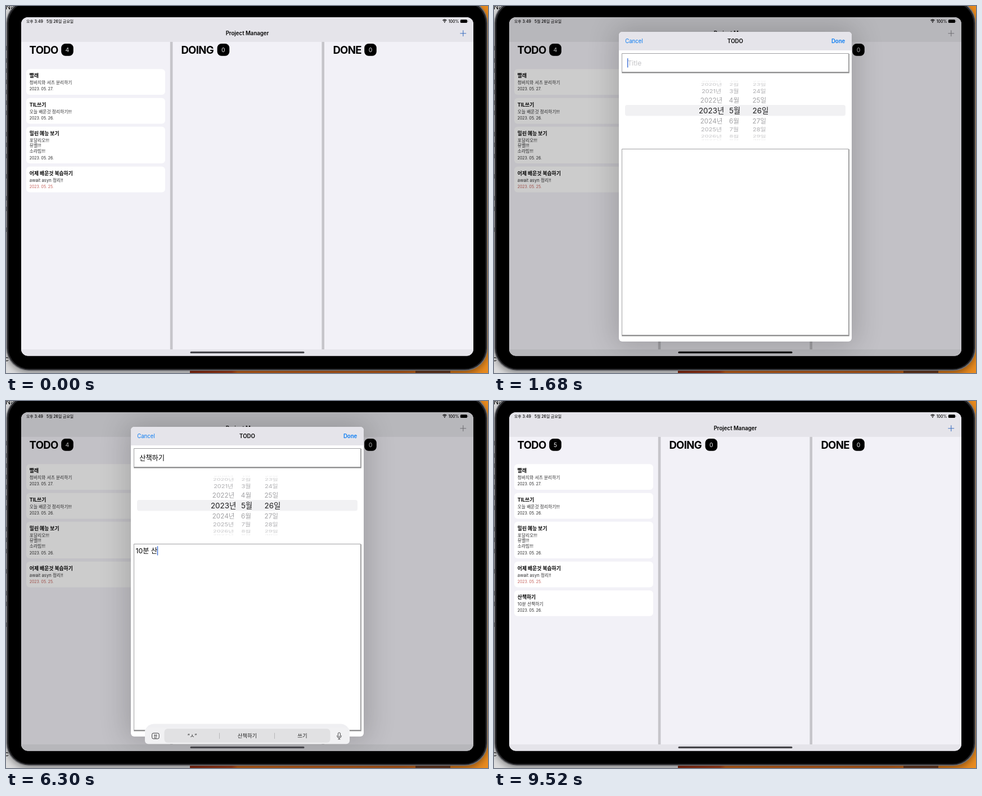
Recreate the animation shown at these times as an HTML page. Size 857 by 653 pixels, loop 9590 ms.

```html
<!DOCTYPE html>
<html lang="ko">
<head>
<meta charset="utf-8">
<title>Project Manager</title>
<style>
  html, body { margin: 0; width: 100%; height: 100%; overflow: hidden; background: #000; }
  svg { display: block; width: 857px; height: 653px; }
  text { font-family: Inter, "Noto Sans CJK KR", "Noto Sans CJK", sans-serif; white-space: pre; }
  .nav { font-size: 9.65px; font-weight: 600; }
  .head { font-size: 18.6px; font-weight: 700; letter-spacing: -.7px; }
  .title { font-size: 8.8px; font-weight: 700; }
  .note { font-size: 7.75px; fill: #303032; }
  .date { font-size: 6.9px; fill: #222; }
  .late { fill: #c25a54; }
  .status { font-size: 6.9px; font-weight: 500; }
  .badge { font-size: 10.5px; fill: #e4e4e6; }
  .input { font-size: 12.2px; }
  .word { font-size: 9.4px; fill: #222; }
  .blue { fill: #087bf3; }
  .mid { text-anchor: middle; }
  .end { text-anchor: end; }
</style>
</head>
<body>
<svg id="stage" viewBox="0 0 857 653"></svg>
<script>
const LOOP = 9590, STEP = 70;

const text = (x, y, cls, s, extra = '') => `<text x="${x}" y="${y}" class="${cls}" ${extra}>${s}</text>`;
const rect = (x, y, w, h, fill, r = 0, extra = '') =>
  `<rect x="${x}" y="${y}" width="${w}" height="${h}" rx="${r}" fill="${fill}" ${extra}/>`;
const line = (d, stroke, w = 1, extra = '') =>
  `<path d="${d}" fill="none" stroke="${stroke}" stroke-width="${w}" ${extra}/>`;

function card(y, title, notes, date, late = '') {
  const extra = (notes.length - 1) * 9.8;
  return rect(36, y, 247, 45.8 + extra * .99, '#fff', 6) +
    text(41.8, y + 15.2, 'title', title) +
    notes.map((n, i) => text(41.8, y + 26.8 + i * 9.8, 'note', n)).join('') +
    text(41.8, y + 38.2 + extra, 'date ' + late, date);
}

function column(x, name, badgeX, id) {
  return text(x, 84.6, 'head', name) + rect(badgeX, 67, 21.6, 21.8, '#000', 7.5) +
    text(badgeX + 10.8, 81.7, 'badge mid', '0', `id="${id}"`);
}

function backdrop() {
  const scraps = [75, 97, 115, 135, 153, 172, 190, 228, 247, 267, 303, 342, 361, 398]
    .map(y => rect(0, y - 4, 1.4, 8, '#333')).join('');
  return rect(0, 0, 857, 653, '#dcdcdd') + rect(327, 0, 530, 653, 'url(#dusk)') +
    rect(728, 648, 62, 5, '#6b3a20') + scraps +
    text(-1, 6, 'input', 'Na') + text(-2, 632, 'input', 'c') +
    rect(0, -6, 857, 660, '#000', 42, 'opacity=".35" style="filter:blur(6px)"') +
    rect(.5, -10, 856, 659, '#707175', 40) + rect(2, -8.5, 853, 656, '#242427', 39) +
    rect(4.5, -6, 848, 651.5, '#000', 37);
}

function board() {
  return rect(27, 20, 804, 603, '#f2f1f7') + rect(27, 20, 804, 43.8, '#e5e4ea') +
    rect(27, 611, 804, 12, '#e5e4ea') +
    rect(291.8, 63.8, 4.6, 547.2, '#c6c5ca') + rect(561.4, 63.8, 4.6, 547.2, '#c6c5ca') +
    text(36, 29.5, 'status', '오후 3:49') + text(72, 29.5, 'status', '5월 26일 금요일') +
    text(805.3, 29.5, 'status end', '100%') +
    line('M776.4 25.6a5 5 0 0 1 7 0M777.8 27.2a3 3 0 0 1 4.2 0', '#000', 1.1) +
    '<path d="M779.9 30l-1.2-1.3a1.7 1.7 0 0 1 2.4 0z"/>' +
    rect(807.8, 24.2, 12.2, 5.8, '#000', 1.6) + rect(820.6, 26, 1, 2.2, '#777', .5) +
    text(429, 52.3, 'nav mid', 'Project Manager') +
    line('M807.4 48.7h10.8M812.8 43.3v10.8', '#3d6fc0', 1.1, 'id="plus"') +
    column(41.6, 'TODO', 98.2, 'count') + column(311.4, 'DOING', 375.6) + column(581.4, 'DONE', 637.2) +
    card(112.2, '빨래', ['청바지와 셔츠 분리하기'], '2023. 05. 27.') +
    card(163.7, 'TIL쓰기', ['오늘 배운것 정리하기!!!'], '2023. 05. 26.') +
    card(214.8, '밀린 예능 보기', ['포달리오!!!', '뮤벨!!!', '소라빔!!!'], '2023. 05. 26.') +
    card(285.8, '어제 배운것 복습하기', ['await asyn 정리!!'], '2023. 05. 25.', 'late') +
    `<g id="added">${card(337, '산책하기', ['10분 산책하기'], '2023. 05. 26.')}</g>`;
}

function wheel() {
  // per distance from the centre: offset, font size, vertical squash, colour
  const rings = [[0, 13.4, 1, '#1c1c1e'], [18.5, 11.7, .95, '#a0a0a3'], [34.2, 11, .83, '#adadb0'],
                 [46.3, 11, .52, '#c6c6c8'], [52, 11, .16, '#e6e6e7']];
  let out = rect(233, 130, 392, 19.6, '#f1f1f3', 4);
  for (let i = -4; i <= 4; i++) {
    const [dy, size, squash, fill] = rings[Math.abs(i)];
    const shift = i ? 1 : 0;
    const put = (x, s) => text(0, size * .36, 'mid', s,
      `font-size="${size}" fill="${fill}" transform="translate(${x} ${140 + Math.sign(i) * dy}) scale(1 ${squash})"`);
    out += put(386.6, 2023 + i + '년') + put(428 - shift, 5 + i + '월') + put(474 - shift * 2.2, 26 + i + '일');
  }
  return out;
}

function field(y, h) {
  const frame = `M227.5 ${y}h403v${h}h-403z`;
  return line(frame, '#000', 1.6, 'class="glow" transform="translate(.5 1.2)" style="filter:blur(.7px)"') +
    `<path d="${frame}" fill="#fff" stroke="#a0a0a2" stroke-width="1"/>`;
}

function sheet() {
  return rect(222, 0, 414, 551, '#fff', 6) +
    '<path d="M222 33V6a6 6 0 0 1 6-6H630a6 6 0 0 1 6 6V33z" fill="#e5e4ea"/>' +
    text(233.2, 20, 'nav blue', 'Cancel', 'style="font-weight:400"') + text(429, 20, 'nav mid', 'TODO') +
    text(624.3, 20, 'nav blue end', 'Done', 'id="done"') +
    field(38.5, 33) + field(208.5, 331) + wheel() +
    text(237.5, 59.8, 'input', 'Title', 'id="hint" fill="#c4c4c7"') +
    text(237.2, 59.7, 'input', '', 'id="name"') + text(230.5, 225, 'input', '', 'id="body"') +
    rect(0, 0, 1.4, 16.5, '#3d6fd6', .6, 'id="caret"');
}

function keyboardBar() {
  const words = [331, 429, 527].map(x => text(x, 599, 'word mid', '', 'data-word')).join('');
  return rect(247, 574.5, 364, 35, '#ededf0', 16, 'opacity=".85"') +
    rect(247, 581, 364, 29.2, '#f1f1f3', 6) + rect(281.5, 583, 295, 25, '#e1e1e3', 6) +
    line('M379.5 590.5v10.5M477.5 590.5v10.5', '#b2b2b5', .9) + words +
    rect(259.6, 591, 12.6, 10, 'none', 2.6, 'stroke="#3a3a3c" stroke-width="1"') +
    text(265.9, 598.6, 'mid', '한', 'font-size="6.6" font-weight="500"') +
    rect(590.4, 590, 4, 7.4, 'none', 2, 'stroke="#3a3a3c" stroke-width=".9"') +
    line('M588.6 595v.8a3.8 3.6 0 0 0 7.6 0v-.8M592.4 599.4v2.4M590.4 601.8h4', '#3a3a3c', .9);
}

document.getElementById('stage').innerHTML = `
  <defs>
    <clipPath id="screen"><rect x="27" y="20" width="804" height="602.5" rx="12"/></clipPath>
    <linearGradient id="dusk">
      <stop offset="0" stop-color="#8a2b13"/><stop offset=".14" stop-color="#a8401a"/>
      <stop offset=".16" stop-color="#c9661d"/><stop offset=".7" stop-color="#c0601c"/>
      <stop offset="1" stop-color="#ea8c1f"/>
    </linearGradient>
  </defs>
  ${backdrop()}
  <g clip-path="url(#screen)">
    ${board()}
    ${rect(27, 20, 804, 603, '#000', 0, 'id="dim"')}
    <g id="modal">
      ${rect(214, -8, 430, 567, '#000', 14, 'id="shade" style="filter:blur(25px)"')}
      ${sheet()}
    </g>
    <g id="keys">${keyboardBar()}</g>
    ${rect(327.5, 614.7, 203, 3.3, '#000', 1.6, 'id="home"')}
  </g>`;

const $ = id => document.getElementById(id);
const set = (id, attrs) => { for (const k in attrs) $(id).setAttribute(k, attrs[k]); };
const wordSlots = document.querySelectorAll('[data-word]');
const glows = document.querySelectorAll('.glow');

const nameKeys = [[0, ''], [2450, 'ㅅ'], [2590, '사'], [2730, '산'], [2800, '산ㅊ'], [2940, '산채'],
  [3080, '산책'], [3360, '산책ㅎ'], [3430, '산책하'], [3570, '산책학'], [3710, '산책하기']];
const bodyKeys = [[0, ''], [5040, '1'], [5180, '10'], [5600, '10ㅂ'], [5740, '10부'], [5880, '10분'],
  [6090, '10분 '], [6160, '10분 ㅅ'], [6230, '10분 사'], [6300, '10분 산'], [6510, '10분 산ㅊ'],
  [6580, '10분 산채'], [6720, '10분 산책'], [6930, '10분 산책ㅎ'], [7000, '10분 산책하'],
  [7070, '10분 산책학'], [7140, '10분 산책하기']];
const wordKeys = [[0, ''], [2590, '“ㅅ”'], [2800, '“산”,산책,산에'], [3150, '“산책”,산책하,산책로'],
  [3570, '“산책하”,산책하기,산책하는'], [3850, '“산책하기”'], [4270, ''], [5180, '“10”'], [5740, '“부”'],
  [5950, '“분”'], [6300, '“ㅅ”,산책하기,쓰기'], [6510, '“산”,산책,산책로'], [6720, '“산책”,산책하기,산책로'],
  [7070, '“산책하”,산책하기,산책로'], [7420, '“산책하기”'], [8470, '']];

const at = (keys, t) => keys.reduce((v, [start, next]) => t >= start ? next : v, '');
const ramp = (t, a, b) => Math.min(1, Math.max(0, (t - a) / (b - a)));
const spring = (ms, rate) => { const x = Math.max(0, ms) / 1000 * rate; return 1 - (1 + x) * Math.exp(-x); };

function shown(t) {
  if (t < 1190) return spring(t - 550, 10.77);
  if (t < 8470) return 1;
  return t < 8960 ? 1 - spring(t - 8523, 14) : 0;
}

function draw(t) {
  const p = shown(t), added = t >= 8470;
  set('modal', {
    transform: `translate(0 ${Math.round(46 + 577 * (1 - p))})`,
    visibility: p > 0 ? 'visible' : 'hidden'
  });
  set('dim', { opacity: .2 * p });
  set('shade', { opacity: .18 * p });
  set('plus', { stroke: t >= 490 && t < 8680 ? '#8b8b90' : '#3d6fc0' });
  $('count').textContent = added ? 5 : 4;
  set('added', { visibility: added ? 'visible' : 'hidden' });
  glows.forEach(g => g.style.opacity = t >= 1050 ? .45 : 0);
  set('done', { opacity: t >= 8120 ? .3 : 1 });

  const name = at(nameKeys, t), body = at(bodyKeys, t);
  $('name').textContent = name;
  $('body').textContent = body;
  set('hint', { visibility: name ? 'hidden' : 'inherit' });

  const inBody = t >= 4200, input = $(inBody ? 'body' : 'name');
  const width = (inBody ? body : name) ? input.getComputedTextLength() : 0;
  set('caret', {
    x: +input.getAttribute('x') + width - .2,
    y: inBody ? 212.2 : 47,
    opacity: t < 1680 ? 0 : 1 - ramp(t, 7630, 7840)
  });

  const words = at(wordKeys, t).split(',');
  wordSlots.forEach((slot, i) => slot.textContent = words[i] || '');

  const keysIn = ramp(t, 1680, 2100), keysOut = ramp(t, 8470, 8750);
  const alpha = (1 - (1 - keysIn) ** 2) * (1 - keysOut);
  const scale = 1 - .02 * Math.max(1 - keysIn, ramp(t, 8470, 8540));
  set('keys', { opacity: alpha, transform: `translate(429 596) scale(${scale}) translate(-429 -596)` });
  set('home', { fill: t >= 560 && t < 1890 ? '#000' : '#45454a' });
}

const begin = performance.now();
function tick() {
  const t = (performance.now() - begin) % LOOP;
  draw(Math.floor(t / STEP) * STEP);
  requestAnimationFrame(tick);
}
tick();
</script>
</body>
</html>
```
